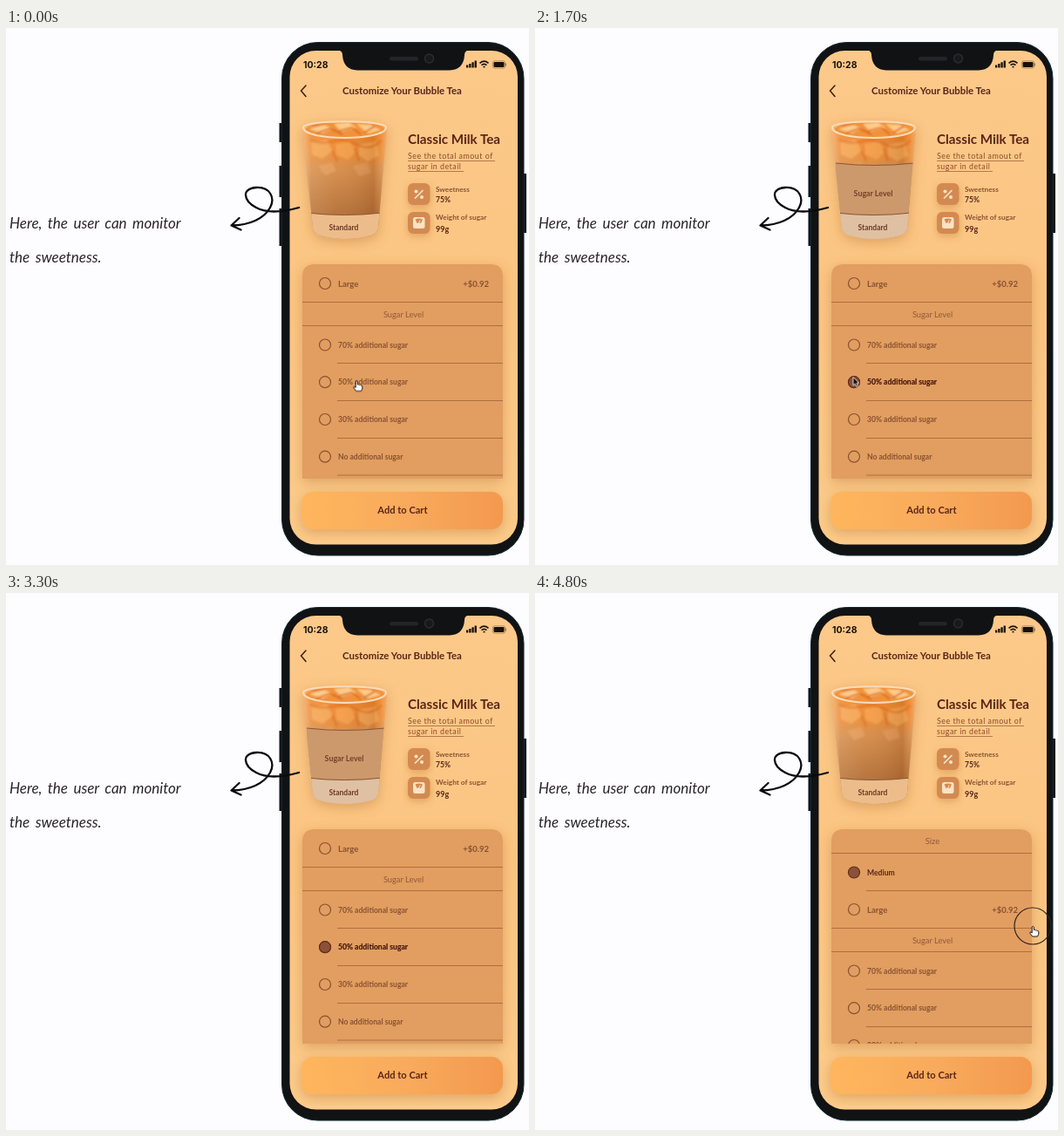
Recreate the animation shown at these times as an HTML page. Size 600 by 616 pixels, loop 4.9 s.

```html
<!DOCTYPE html>
<html lang="en">
<head>
<meta charset="utf-8">
<title>Bubble tea sweetness</title>
<style>
  html, body { margin: 0; width: 100%; height: 100%; overflow: hidden; background: #fdfcff; }
  svg { display: block; width: 600px; height: 616px; }
  text { font-family: Lato, "Open Sans", sans-serif; font-weight: 700; fill: #5a2518; }
  .note { font-size: 17px; font-style: italic; font-weight: 400; word-spacing: 2.5px; fill: #29262a; }
  .mid { text-anchor: middle; }
  .soft { fill: #8a5132; }
  .row { font-size: 8.6px; }
  .head { font-size: 9.3px; font-weight: 400; text-anchor: middle; fill: #93583a; }
  .link { font-size: 8.9px; letter-spacing: .5px; font-weight: 400; fill: #8c4a2a; }
  .ink { fill: none; stroke: #0b0a0b; stroke-width: 2.3; stroke-linecap: round; stroke-linejoin: round; }
  .rule { stroke: #ae6e40; stroke-width: 1; fill: none; }

  .list, .chosen, .cursor, .hand, .arrow, .touch { animation: 4.9s linear infinite; }
  .list { animation-name: scroll; animation-timing-function: step-end; }
  .chosen { animation-name: choose; }
  .cursor { animation-name: move; }
  .hand { animation-name: hand; animation-timing-function: step-end; }
  .arrow { animation-name: arrow; animation-timing-function: step-end; }
  .touch { animation-name: touch; animation-timing-function: step-end; }

  @keyframes scroll {
    0% { transform: translateY(-70px); }
    91.84%, 100% { transform: translateY(0); }
  }
  @keyframes choose {
    0%, 16.33% { opacity: 0; }
    24.49%, 91.83% { opacity: 1; }
    91.84%, 100% { opacity: 0; }
  }
  @keyframes move {
    0%, 2.04% { transform: translate(402px, 404.5px); animation-timing-function: ease-in-out; }
    14.29%, 36.73% { transform: translate(365px, 400.5px); animation-timing-function: ease-in-out; }
    53.06% { transform: translate(558px, 394px); }
    55.1% { transform: translate(576px, 393px); animation-timing-function: step-end; }
    91.84% { transform: translate(583px, 384px); animation-timing-function: ease-out; }
    95.92%, 100% { transform: translate(571px, 382px); }
  }
  @keyframes hand {
    0% { opacity: 1; }
    16.33% { opacity: 0; }
    91.84%, 100% { opacity: 1; }
  }
  @keyframes arrow {
    0% { opacity: 0; }
    16.33% { opacity: 1; }
    55.1%, 100% { opacity: 0; }
  }
  @keyframes touch {
    0% { opacity: 0; }
    95.92%, 100% { opacity: 1; }
  }
</style>
</head>
<body>
<svg viewBox="0 0 600 616">
  <defs>
    <linearGradient id="screen" x2="0" y2="1">
      <stop stop-color="#fcc98a"/><stop offset=".5" stop-color="#fbc582"/><stop offset="1" stop-color="#fccb8b"/>
    </linearGradient>
    <linearGradient id="button">
      <stop stop-color="#feb65d"/><stop offset=".5" stop-color="#f9ab5c"/><stop offset="1" stop-color="#f3994f"/>
    </linearGradient>
    <linearGradient id="tea" x2="0" y2="1">
      <stop stop-color="#f4a353"/><stop offset=".14" stop-color="#ef8426"/>
      <stop offset=".3" stop-color="#e88a36"/><stop offset=".42" stop-color="#d48a48"/>
      <stop offset=".78" stop-color="#b06c34"/><stop offset="1" stop-color="#b87b46"/>
    </linearGradient>
    <linearGradient id="glass">
      <stop stop-color="#fbd9b4" stop-opacity=".7"/><stop offset=".12" stop-color="#fbd9b4" stop-opacity=".22"/>
      <stop offset=".4" stop-color="#fbd9b4" stop-opacity=".08"/><stop offset=".82" stop-color="#7d3d12" stop-opacity=".16"/>
      <stop offset=".9" stop-color="#fbd9b4" stop-opacity=".12"/><stop offset="1" stop-color="#fbd9b4" stop-opacity=".6"/>
    </linearGradient>
    <filter id="shade" x="-20%" y="-30%" width="140%" height="160%">
      <feDropShadow dx="0" dy="3" stdDeviation="4" flood-color="#a65d20" flood-opacity=".3"/>
    </filter>
    <filter id="halo" x="-20%" y="-30%" width="140%" height="160%">
      <feDropShadow dx="0" dy="4" stdDeviation="7" flood-color="#b0662a" flood-opacity=".38"/>
    </filter>
    <filter id="melt"><feGaussianBlur stdDeviation="1.300"/></filter>
    <clipPath id="cup"><path d="M340 115C341 104 436 104 437 115L427 229Q426 236 419 238Q389 246 360 238Q353 236 352 229Z"/></clipPath>
    <clipPath id="panel"><path d="M340 517V285Q340 272 353 272H557Q570 272 570 285V517Z"/></clipPath>
    <circle id="radio" cx="366" r="6.500" fill="none" stroke="#8a5030" stroke-width="1.200"/>
    <circle id="radioOn" cx="366" r="6.500" fill="#8c5138" stroke="#5f2d1d" stroke-width="1.200"/>
  </defs>

  <rect width="600" height="616" fill="#fdfcff"/>
  <text class="note" x="4" y="230">Here, the user can monitor</text>
  <text class="note" x="4" y="269">the sweetness.</text>

  <!-- phone -->
  <path d="M315 109v22M315 158v36M315 207v43M595.500 167v68" stroke="#10171c" stroke-width="3"/>
  <rect x="316.500" y="16.500" width="277.500" height="588.500" rx="41" fill="#111214" stroke="#0c2833"/>
  <rect x="325.500" y="26" width="261.500" height="566.500" rx="30" fill="url(#screen)"/>
  <path d="M381 25.500Q386 26 386 31Q387 48 403 48.500H509Q525 48 526 31Q526 26 531 25.500Z" fill="#111214"/>
  <rect x="440" y="33" width="33" height="4.500" rx="2.200" fill="#242528"/>
  <circle cx="485.500" cy="35" r="5" fill="#18191d" stroke="#2b2c31" stroke-width="1.500"/>

  <text x="341" y="45.500" style="font:700 10.500px Inter,sans-serif;fill:#17100b">10:28</text>
  <g fill="#17100b">
    <path d="M528 42.500h2.300v3h-2.300zM531.200 41h2.300v4.500h-2.300zM534.400 39.300h2.300v6.200h-2.300zM537.600 37.500h2.300v8h-2.300z"/>
    <rect x="559.500" y="39" width="12" height="6" rx="1.300"/>
    <path d="M573.300 40.500v3" stroke="#17100b" stroke-opacity=".5"/>
  </g>
  <g fill="none" stroke="#17100b" stroke-width="1.600">
    <path d="M543.500 40.300Q548.500 36 553.500 40.300M545.500 42.600Q548.500 40 551.500 42.600"/>
    <path d="M547.500 44.600h2"/>
    <rect x="558.300" y="37.800" width="14.400" height="8.400" rx="2.400" stroke-width=".7" stroke-opacity=".45"/>
  </g>
  <path d="M344 66L338.500 72L344 78.500" fill="none" stroke="#3d1c12" stroke-width="1.500" stroke-linecap="round"/>
  <text class="mid" x="454.500" y="75.500" font-size="11.400">Customize Your Bubble Tea</text>

  <!-- cup -->
  <g filter="url(#halo)">
    <g clip-path="url(#cup)">
      <rect x="338" y="102" width="102" height="144" fill="url(#tea)"/>
      <g filter="url(#melt)">
        <path d="M350 131l18-3 7 13-12 9-12-5zM405 134l19-4 4 16-13 7-10-7z" fill="#fab465" fill-opacity=".6"/>
        <path d="M378 133l17-3 7 12-10 9-13-6z" fill="#f7a24c" fill-opacity=".8"/>
        <path d="M358 158l16-4 5 10-13 5zM398 158l17-4 4 12-14 4z" fill="#eaa969" fill-opacity=".45"/>
        <path d="M348 128q13 6 27 2t28 4t28-5M374 140l6 13M400 138l5 14" fill="none" stroke="#d9600f" stroke-width="2.500" stroke-opacity=".55"/>
      </g>
      <rect x="338" y="102" width="102" height="144" fill="url(#glass)"/>
      <ellipse cx="389" cy="117" rx="45.500" ry="9" fill="#f0923c"/>
      <g filter="url(#melt)">
        <path d="M348 116l14-6 13 5-12 6zM376 110l17-2 9 6-17 5zM402 110l16 1 12 6-15 4z" fill="#fdcb8b"/>
        <path d="M356 121l16-6 14 7M382 118l15-4 10 8M411 120l12-7M352 113l14-3" fill="none" stroke="#d8620f" stroke-width="1.500"/>
      </g>
      <path d="M345 212Q388 217 432 212V247H345Z" fill="#ecbd8b"/>
      <path d="M345 212Q388 217 432 212" fill="none" stroke="#8a5733" stroke-width="1"/>
      <g class="chosen">
        <path d="M345 155Q389 160 435 155V212Q388 217 345 212Z" fill="#cc996d"/>
        <path d="M345 212Q388 217 432 212V247H345Z" fill="#dfc0a2"/>
        <path d="M345 155Q389 160 435 155M345 212Q388 217 432 212" fill="none" stroke="#875534" stroke-width="1"/>
        <text class="mid" x="388" y="192.500" font-size="8.900" style="fill:#74412a">Sugar Level</text>
      </g>
    </g>
    <path d="M341 114C341 130 436 130 436 114C435 105 342 105 341 114Z" fill="none" stroke="#fbdcbc" stroke-width="2"/>
  </g>
  <text class="mid" x="387.500" y="232" font-size="8.500" style="fill:#6d3b24">Standard</text>

  <!-- product details -->
  <text x="461" y="133" font-size="15.200">Classic Milk Tea</text>
  <text class="link" x="461" y="150">See the total amout of</text>
  <text class="link" x="461" y="162">sugar in detail</text>
  <path d="M461 152.500h100M461 164.500h64" stroke="#b0703f" stroke-width=".9"/>
  <g filter="url(#shade)" fill="#d38a51">
    <rect x="461" y="178" width="25.500" height="25" rx="6"/>
    <rect x="461" y="211" width="25.500" height="25" rx="6"/>
  </g>
  <g fill="#fbe3c4">
    <circle cx="470.500" cy="187.500" r="2"/><circle cx="477" cy="194" r="2"/>
    <path d="M469.500 195L478 186.500" stroke="#fbe3c4" stroke-width="1.700" stroke-linecap="round"/>
    <rect x="467" y="217" width="13.500" height="13" rx="2.500"/>
    <path d="M469.500 219.500Q473.700 217.500 478 219.500L476 224Q473.700 222.500 471.500 224Z" fill="#d38a51"/>
    <path d="M473.700 223.500l1.500-3" stroke="#fbe3c4"/>
  </g>
  <text class="soft" x="493" y="187.500" font-size="8.200">Sweetness</text>
  <text x="493" y="200" font-size="8.600">75%</text>
  <text class="soft" x="493" y="220" font-size="8.300">Weight of sugar</text>
  <text x="493" y="233.500" font-size="9">99g</text>

  <!-- options -->
  <path d="M340 517V285Q340 271 354 271H556Q570 271 570 285V517Z" fill="#e19e60" filter="url(#halo)"/>
  <g clip-path="url(#panel)">
    <g class="list">
      <path class="rule" d="M340 298.500h230M380 341.500h190M340 384.500h230M340 411.500h230M380 454.500h190M380 497.500h190M380 540.500h190M380 583h190"/>
      <text class="head" x="456" y="288">Size</text>
      <use href="#radioOn" y="320.500"/>
      <text x="381" y="323.500" font-size="8.600">Medium</text>
      <use href="#radio" y="363"/>
      <text class="soft" x="381" y="366.500" font-size="9.500">Large</text>
      <text class="soft" x="554" y="366.500" font-size="9.500" text-anchor="end">+$0.92</text>
      <text class="head" x="456" y="401.500">Sugar Level</text>
      <use href="#radio" y="433.500"/>
      <text class="row soft" x="381" y="436.500">70% additional sugar</text>
      <use href="#radio" y="476.200"/>
      <text class="row soft" x="381" y="479.300">50% additional sugar</text>
      <g class="chosen">
        <use href="#radioOn" y="476.200"/>
        <text class="row" x="381" y="479.300" style="fill:#4c1c12">50% additional sugar</text>
      </g>
      <use href="#radio" y="519"/>
      <text class="row soft" x="381" y="522">30% additional sugar</text>
      <use href="#radio" y="561.700"/>
      <text class="row soft" x="381" y="564.700">No additional sugar</text>
    </g>
  </g>

  <rect x="339" y="532" width="231" height="43" rx="13" fill="url(#button)" filter="url(#halo)"/>
  <text class="mid" x="455" y="557" font-size="11.100">Add to Cart</text>

  <path class="ink" d="M336 206C318 211 300 213 287 206C272 198 270 184 287 183C303 182 309 195 303 206C296 219 279 226 259 226.500M267.500 218L258.500 226.500L269.500 231.500"/>

  <!-- cursor, hot spot at 0,0 -->
  <g class="cursor">
    <circle class="touch" r="21" fill="none" stroke="#2c2320" stroke-width="1.200"/>
    <path class="hand" d="M-.8 1Q.3-.6 1.300 1V4.500Q2.600 3.600 3.300 5Q4.600 4.300 5.200 5.600Q6.700 5.200 6.800 6.800V9.200L5.500 12H-.3L-3.200 8.200Q-3.400 6.600-1.900 7L-.8 8Z"
      fill="#fff" stroke="#201a1a" stroke-width="1" stroke-linejoin="round"/>
    <path class="arrow" d="M0 0V9.500L2.200 7.500L3.800 11.200L5.500 10.500L3.900 6.900H6.800Z"
      fill="#0b0a0a" stroke="#fff" stroke-width=".8" stroke-linejoin="round"/>
  </g>
</svg>
</body>
</html>
```
